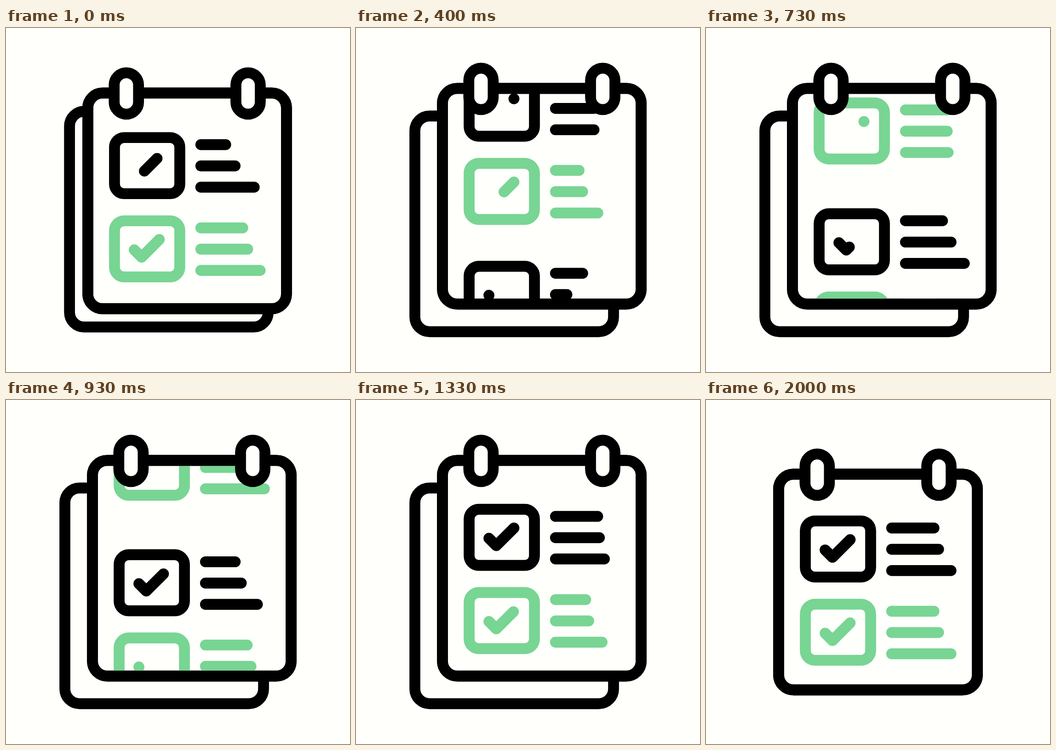
Recreate the animation shown at these times as an HTML page with a canvas. Size 748 by 748 pixels, loop 2070 ms.

```html
<!DOCTYPE html>
<html lang="en">
<head>
<meta charset="utf-8">
<title>Checklist</title>
<style>
  html, body { margin: 0; width: 100%; height: 100%; overflow: hidden; background: #fffffc; }
  canvas { display: block; }
</style>
</head>
<body>
<canvas id="stage" width="748" height="748"></canvas>
<script>
const ctx = document.getElementById('stage').getContext('2d');
const LOOP = 2070, FRAME = 1000 / 15;
const PAPER = '#fffffc', INK = '#000', GREEN = '#78d593';
const LINE_WIDTHS = [92, 102, 129];
const CHECK_LENGTH = 77;

const clamp = v => Math.min(1, Math.max(0, v));
const progress = (t, start, span) => clamp((t - start) / span);
const wave = u => (1 - Math.cos(Math.PI * u)) / 2;
const easeOut = u => 1 - (1 - u) ** 3;

// Cubic bezier (.242, 0, .75, 1), solved by bisection
function ease(x) {
  let lo = 0, hi = 1, b;
  for (let i = 0; i < 24; i++) {
    b = (lo + hi) / 2;
    const bx = 0.726 * b * (1 - b) ** 2 + 2.25 * b * b * (1 - b) + b ** 3;
    if (bx < x) lo = b; else hi = b;
  }
  return b * b * (3 - 2 * b);
}

// Each line shortens to `low` around its centre time and grows back
const dip = (t, centre, low) => low + (1 - low) * wave(clamp(Math.abs(t - centre) / 400));

const leaving = [
  { color: INK, y: 0, check: [-170, 400], dipAt: 75, endAt: t => 0.91 + 0.09 * clamp(t / 230) },
  { color: GREEN, y: 181, check: [80, 555], dipAt: 365, endAt: () => 1 }
];
const arriving = [
  { color: INK, y: 0, check: [560, 400], dipAt: 955, growAt: 175 },
  { color: GREEN, y: 181, check: [960, 400], dipAt: 1277, growAt: 495 }
];

function box(x, y, w, h, r, fill) {
  ctx.beginPath();
  ctx.roundRect(x, y, w, h, r);
  if (fill) {
    ctx.fillStyle = fill;
    ctx.fill();
  }
  ctx.stroke();
}

function check(from, to) {
  if (to <= from) return;
  ctx.save();
  ctx.setLineDash([Math.max(0.1, (to - from) * CHECK_LENGTH), 999]);
  ctx.lineDashOffset = -from * CHECK_LENGTH;
  ctx.beginPath();
  ctx.moveTo(259, 326);
  ctx.lineTo(275, 342);
  ctx.lineTo(313.5, 303.5);
  ctx.stroke();
  ctx.restore();
}

function line(y, length) {
  ctx.beginPath();
  ctx.moveTo(403.7, y);
  ctx.lineTo(403.7 + Math.max(0.1, length), y);
  ctx.stroke();
}

function item(it, t, offset) {
  const isNew = 'growAt' in it;
  const p = ease(progress(t, ...it.check));
  ctx.save();
  ctx.translate(0, it.y + offset);
  ctx.strokeStyle = it.color;
  box(216, 263, 142, 122, 21);
  if (isNew) check(0, p);
  else check(p, p < 1 ? it.endAt(t) : 0);
  LINE_WIDTHS.forEach((width, i) => {
    const grown = isNew ? wave(progress(t, it.growAt + 100 * i, 380)) : 1;
    if (grown > 0) line(278.3 + 46.3 * i, width * grown * dip(t, it.dipAt + 100 * i, isNew ? 0.7 : 0.55));
  });
  ctx.restore();
}

const page = fill => box(158, 161.3, 432, 469, 32, fill);

function draw(t) {
  const spread = 30 * (easeOut(progress(t, -70, 230)) - easeOut(progress(t, 1432, 230)));
  const scroll = ease(progress(t, -70, 1480));

  ctx.fillStyle = PAPER;
  ctx.fillRect(0, 0, 748, 748);
  ctx.lineWidth = 23.7;
  ctx.lineCap = ctx.lineJoin = 'round';
  ctx.strokeStyle = INK;

  ctx.save();
  ctx.translate(-spread, spread);
  page();
  ctx.restore();

  ctx.save();
  ctx.translate(spread, -spread);
  page(PAPER);

  ctx.save();
  ctx.beginPath();
  ctx.roundRect(158, 161.3, 432, 469, 32);
  ctx.clip();
  leaving.forEach(it => item(it, t, -448 * scroll));
  arriving.forEach(it => item(it, t, 389 * (1 - scroll)));
  ctx.restore();

  page();
  for (const x of [215.3, 480]) box(x, 117.3, 53, 90, 26.5, PAPER);
  ctx.restore();
}

const begin = performance.now();
function tick() {
  const t = (performance.now() - begin) % LOOP;
  // The motion runs in steps of 15 per second
  draw(Math.min(30, Math.floor((t + 3.4) / FRAME)) * FRAME);
  requestAnimationFrame(tick);
}
tick();
</script>
</body>
</html>
```
